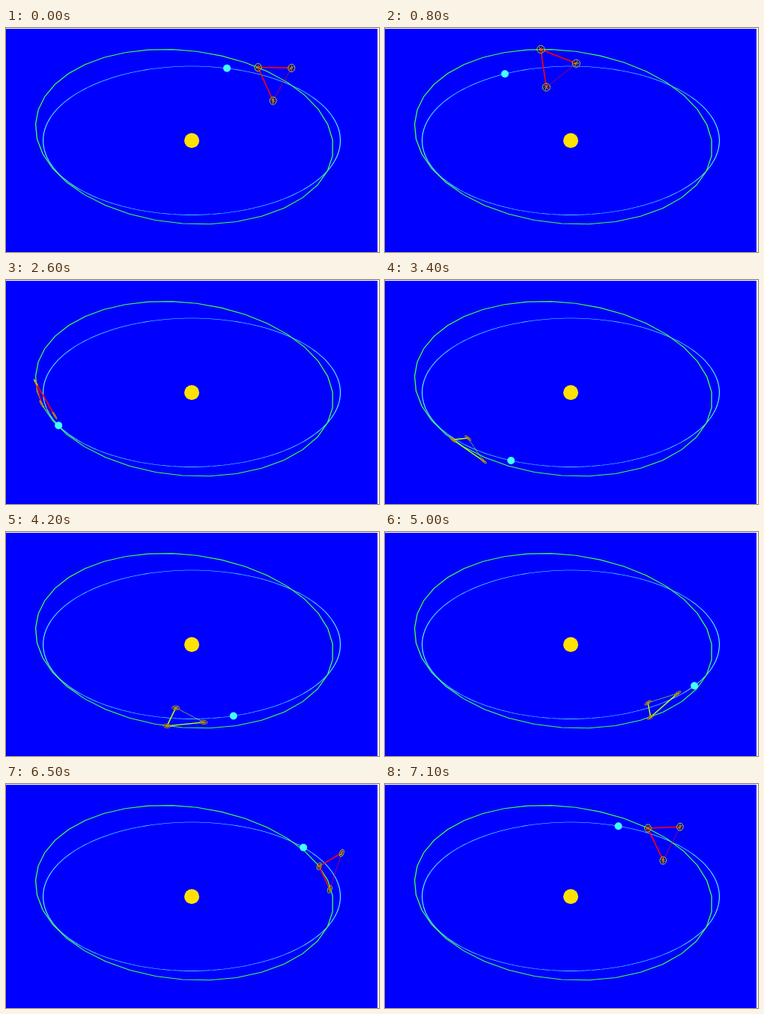
An HTML page with a canvas for the animation above (7200 ms loop, 498x299 px).

```html
<!DOCTYPE html>
<html lang="en">
<head>
<meta charset="utf-8">
<title>Triangle formation orbiting the Sun</title>
<style>
html, body { margin: 0; width: 100%; height: 100%; overflow: hidden; background: #fff; }
canvas { display: block; }
</style>
</head>
<body>
<canvas id="stage" width="498" height="299"></canvas>
<script>
const ctx = document.getElementById('stage').getContext('2d');
const { sin, cos, PI } = Math;
const RAD = PI / 180, AU = 198.4, ECC = 0.0744;
const SUN = [248, 150.2];
const STEP_MS = 100, STEPS = 72;
const PHASE = 76.3, LAG = 20, PERIHELION = -48.5;

// View from 30 degrees above the ecliptic
const project = (x, y, z) => [SUN[0] + AU * x, SUN[1] - AU * (y / 2 + z * 0.866)];

// First-order position of craft k for a formation centre at angle deg
function craft(deg, k) {
  const a = deg * RAD, b = (PERIHELION + 120 * k) * RAD, h = ECC / 2;
  return project(
    cos(a) + h * (cos(2 * a - b) - 3 * cos(b)),
    sin(a) + h * (sin(2 * a - b) - 3 * sin(b)),
    -Math.sqrt(3) * ECC * cos(a - b));
}

// squash flattens the pen, as for a ribbon lying in a tilted plane
function stroke(points, color, width, closed = false, squash = 1) {
  ctx.beginPath();
  for (const p of points) ctx.lineTo(...p);
  if (closed) ctx.closePath();
  ctx.strokeStyle = color;
  ctx.lineWidth = width;
  ctx.save();
  ctx.scale(1, squash);
  ctx.stroke();
  ctx.restore();
}

function disc([x, y], r, color) {
  ctx.beginPath();
  ctx.arc(x, y, r, 0, 2 * PI);
  ctx.fillStyle = color;
  ctx.fill();
}

const around = (n, f) => Array.from({ length: n }, (_, i) => f(i * 360 / n));
const earthAt = deg => project(cos(deg * RAD), sin(deg * RAD), 0);
const earthOrbit = around(180, earthAt);
const craftOrbit = around(36, deg => craft(deg + 2, 0));

// Spoked wheel lying in the plane of the triangle
function wheel(p, center, next, last, below) {
  const s = 5.2 / (2 * ECC * AU);
  const u = [0, 1].map(i => (p[i] - center[i]) * s);
  const v = [0, 1].map(i => (next[i] - last[i]) * s / Math.sqrt(3));
  const at = (deg, r) => [0, 1].map(i =>
    p[i] + r * (u[i] * cos(deg * RAD) + v[i] * sin(deg * RAD)));
  const ring = r => around(24, deg => at(deg, r));
  const spoke = (deg, color) => stroke([at(deg, -0.75), at(deg, 0.75)], color, 0.9);
  stroke(ring(0.7), '#201000', 1, true);
  stroke(ring(0.98), below ? '#d0a820' : '#b0f010', 0.9, true);
  spoke(0, below ? '#d0a820' : '#b0f010');
  spoke(60, '#e0c000');
  spoke(120, below ? '#c89018' : '#ff2000');
}

function draw(step) {
  const earth = PHASE + step * 360 / STEPS;
  const crafts = [0, 1, 2].map(k => craft(earth - LAG, k));
  const [a, b, c] = crafts;
  const center = [0, 1].map(i => (a[i] + b[i] + c[i]) / 3);
  const below = (b[0] - a[0]) * (c[1] - a[1]) > (b[1] - a[1]) * (c[0] - a[0]);
  const beam = below ? '#a8ff00' : '#ff0000';

  ctx.fillStyle = '#fff';
  ctx.fillRect(0, 0, 498, 299);
  ctx.fillStyle = '#00f';
  ctx.fillRect(0, 1, 496, 298);

  stroke(earthOrbit, '#60ffff', 1.15, true, 0.5);
  stroke(craftOrbit, '#40ff40', 1.35, true, 0.8);
  disc(SUN, 10, '#ffe200');

  stroke([b, c], beam, 0.65);
  stroke([b, a, c], beam, 1.6);
  crafts.forEach((p, k) =>
    wheel(p, center, crafts[(k + 1) % 3], crafts[(k + 2) % 3], below));
  disc(earthAt(earth), 5, '#44ffff');
}

function tick(now) {
  draw(Math.floor(now / STEP_MS) % STEPS);
  requestAnimationFrame(tick);
}
requestAnimationFrame(tick);
</script>
</body>
</html>
```
